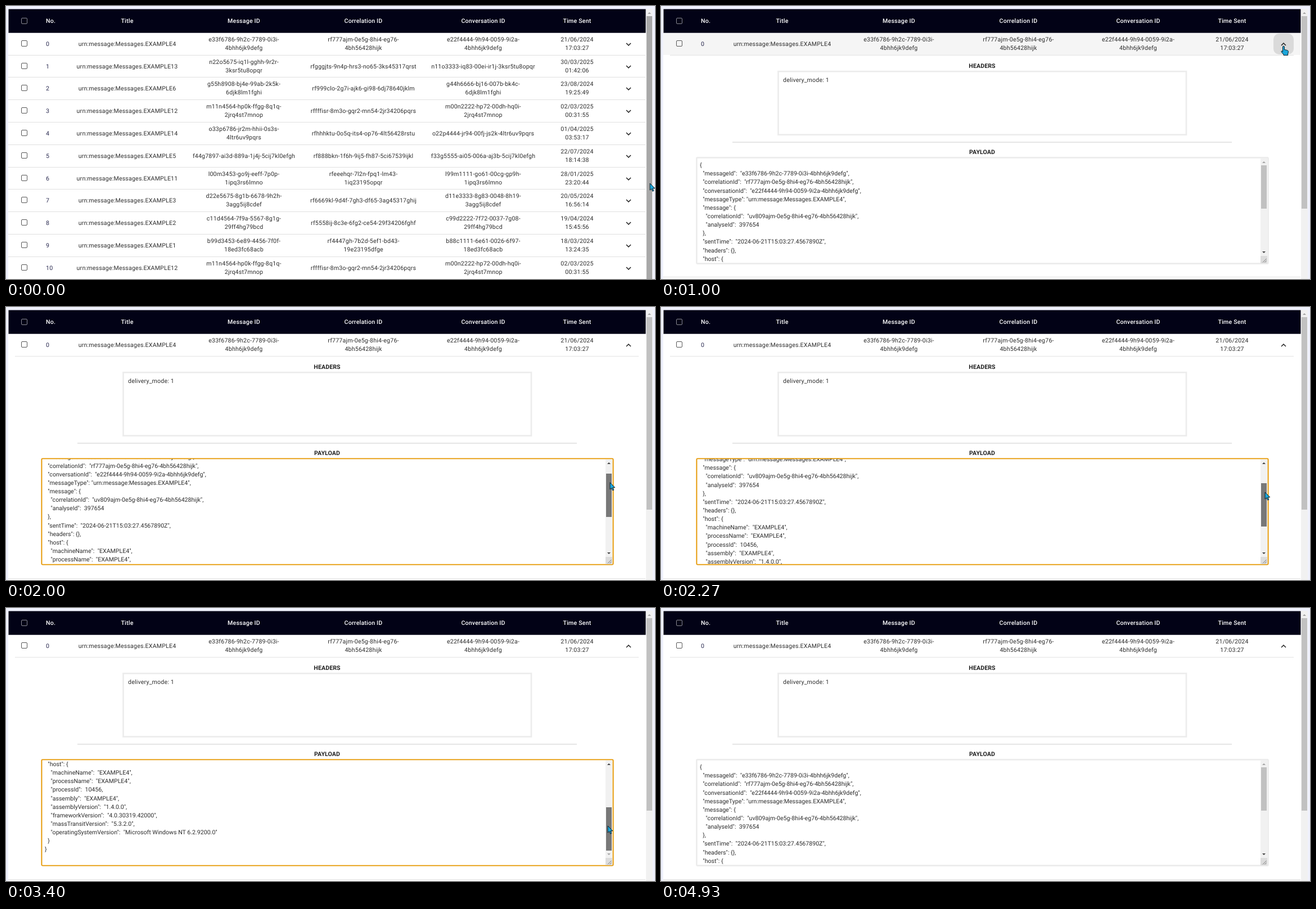
These frames come from a looping animation (1154 px wide and 485 px high, 5.27 s). An HTML page:

```html
<!DOCTYPE html>
<html lang="en">
<head>
<meta charset="utf-8">
<title>Message table</title>
<style>
  html, body { margin: 0; width: 100%; height: 100%; overflow: hidden; background: #eff1fc; }
  #stage {
    position: relative; width: 1154px; height: 485px; overflow: hidden;
    font: 10.6px/15px Roboto, Arial, sans-serif; letter-spacing: .19px;
    color: #2e2e2e; text-rendering: geometricPrecision; cursor: default;
  }
  #stage div, #stage svg, pre { position: absolute; box-sizing: border-box; }
  #stage > svg, #frame { left: 0; top: 0; width: 1154px; height: 485px; }
  .card { left: 4px; top: 5px; width: 1134px; height: 480px; background: #fff; }
  .head { left: 4px; top: 5px; width: 1133px; height: 43px; color: #fff; font-weight: 500; }
  .row { left: 4px; width: 1133px; height: 40px; border-top: 1px solid #e0e0e0; background: #fff; }
  .row.hover { background: #f5f5f5; }
  .cell { white-space: nowrap; text-align: center; }
  .cell.num { text-align: left; color: #2a2a50; }
  .head .cell.num { color: #fff; }
  .box { left: 23px; width: 11px; height: 11px; border: 1.5px solid #565656; border-radius: 2px; }
  .head .box { top: 16px; border-color: #8b8b93; }
  .btn { left: 1085px; top: 1px; width: 36px; height: 37px; border-radius: 10px; }
  .btn svg { left: 9px; top: 9.5px; width: 18px; height: 18px; fill: #1c1c1c; }
  #detail { left: 4px; top: 87px; width: 1133px; overflow: hidden; background: #fff; }
  #inner { left: -4px; top: -87px; width: 1154px; height: 485px; }
  .label { left: 471px; width: 200px; text-align: center; font-weight: 700; letter-spacing: .1px; color: #212121; }
  .field { fill: #fff; stroke: #ececec; stroke-width: 2.6px; }
  .field.focus { stroke: #e59700; stroke-width: 1.9px; }
  #view { left: 65px; top: 270px; width: 1000px; height: 187px; overflow: hidden; }
  pre { left: 4px; margin: 0; font: inherit; line-height: 15.14px; letter-spacing: 0; }
  .track { background: #f1f1f1; width: 12px; }
  .thumb { left: 1px; width: 10px; }
  .tri { left: 3px; border: 3px solid transparent; }
  .tri.up { border-top: 0; border-bottom-color: currentColor; }
  .tri.down { border-bottom: 0; border-top-color: currentColor; }
  #pointer path { fill: #1ba6da; stroke: #0e2029; stroke-linejoin: round; }
</style>
</head>
<body>
<div id="stage">
  <div class="card"></div>
  <div id="rows"></div>
  <div id="detail"><div id="inner">
    <div style="left:16px;top:87px;width:1109px;height:1px;background:#e3e3e3"></div>
    <svg id="frame">
      <rect class="field" x="208.5" y="116.2" width="725.5" height="112.5"/>
      <rect id="payload" class="field" x="63.4" y="269.4" width="1016.2" height="188.2" rx="1.5"/>
    </svg>
    <div class="label" style="top:99px">HEADERS</div>
    <div style="left:217px;top:124px">delivery_mode: 1</div>
    <div style="left:127px;top:241px;width:888px;height:1.5px;background:#e6e6e6"></div>
    <div class="label" style="top:252px">PAYLOAD</div>
    <div id="view"><pre id="json"></pre></div>
    <div class="track" style="left:1066px;top:271px;height:173px">
      <div id="up" class="tri up" style="top:5px"></div>
      <div id="thumb" class="thumb" style="height:77px"></div>
      <div id="down" class="tri down" style="top:165px"></div>
    </div>
    <svg style="left:1066px;top:444px" width="12" height="13">
      <path d="M0 0H12V13H0Z" fill="#dcdcdc"/>
      <path d="M4 11.5L10.5 5M7.5 11.5L10.5 8.5" stroke="#777" fill="none"/>
    </svg>
  </div></div>
  <svg><rect x="4.5" y="5.5" width="1133" height="42.2" fill="#020216"/></svg>
  <div class="head" id="head"><div class="box"></div></div>
  <div class="track" style="left:1138px;top:5px;height:480px">
    <div class="tri up" style="top:6px;color:#a3a3a3"></div>
    <div id="pageThumb" class="thumb" style="top:13px"></div>
  </div>
  <svg><g id="pointer">
    <path id="arrow" d="M0 0V12.2L2.8 9.7 4.8 14.2 6.8 13.3 4.9 9H8.8Z"/>
    <path id="hand" d="M-1.5 1Q-1.5-.8 0-.8Q1.5-.8 1.5 1V5.6L3.5 5.8 5.6 6.4 7.6 7.2Q8.7 8 8.6 9.5L7.6 13V15.5H0V14L-3.8 9.8Q-4.6 8-3 7.8L-1.5 9.2Z"/>
  </g></svg>
</div>
<script>
const LOOP = 5270, STEP = 200 / 3;
const PITCH = 39.8, ROW_TOP = 46.85, DETAIL = 395.4;
const THUMB_MIN = 283, THUMB_MAX = 354, GRAB = 16, SCROLL_RATIO = 2.42;
const $ = id => document.getElementById(id);
const clamp = (v, lo, hi) => Math.min(hi, Math.max(lo, v));

const columns = [["Title", 215.5], ["Message ID", 423], ["Correlation ID", 635.5],
  ["Conversation ID", 848.5], ["Time Sent", 1015.5]];

// title number, message, correlation, conversation, time; "|" breaks the line
const data = [
  "4 e33f6786-9h2c-7789-0i3i-|4bhh6jk9defg rf777ajm-0e5g-8hi4-eg76-|4bh56428hijk e22f4444-9h94-0059-9i2a-|4bhh6jk9defg 21/06/2024|17:03:27",
  "13 n22o5675-iq1l-gghh-9r2r-|3ksr5tu8opqr rfgggjts-9n4p-hrs3-no65-3ks45317qrst n11o3333-iq83-00ei-ir1j-3ksr5tu8opqr 30/03/2025|01:42:06",
  "6 g55h8908-bj4e-99ab-2k5k-|6djk8lm1fghi rf999clo-2g7i-ajk6-gi98-6dj78640jklm g44h6666-bj16-007b-bk4c-|6djk8lm1fghi 23/08/2024|19:25:49",
  "12 m11n4564-hp0k-ffgg-8q1q-|2jrq4st7mnop rffffisr-8m3o-gqr2-mn54-2jr34206pqrs m00n2222-hp72-00dh-hq0i-|2jrq4st7mnop 02/03/2025|00:31:55",
  "14 o33p6786-jr2m-hhii-0s3s-|4ltr6uv9pqrs rfhhhktu-0o5q-its4-op76-4lt56428rstu o22p4444-jr94-00fj-js2k-4ltr6uv9pqrs 01/04/2025|03:53:17",
  "5 f44g7897-ai3d-889a-1j4j-5cij7kl0efgh rf888bkn-1f6h-9ij5-fh87-5ci67539ijkl f33g5555-ai05-006a-aj3b-5cij7kl0efgh 22/07/2024|18:14:38",
  "11 l00m3453-go9j-eeff-7p0p-|1ipq3rs6lmno rfeeehqr-7l2n-fpq1-lm43-|1iq23195opqr l99m1111-go61-00cg-gp9h-|1ipq3rs6lmno 28/01/2025|23:20:44",
  "3 d22e5675-8g1b-6678-9h2h-|3agg5ij8cdef rf6669kl-9d4f-7gh3-df65-3ag45317ghij d11e3333-8g83-0048-8h19-|3agg5ij8cdef 20/05/2024|16:56:14",
  "2 c11d4564-7f9a-5567-8g1g-|29ff4hg79bcd rf5558ij-8c3e-6fg2-ce54-29f34206fghf c99d2222-7f72-0037-7g08-|29ff4hg79bcd 19/04/2024|15:45:56",
  "1 b99d3453-6e89-4456-7f0f-|18ed3fc68acb rf4447gh-7b2d-5ef1-bd43-|19e23195dfge b88c1111-6e61-0026-6f97-|18ed3fc68acb 18/03/2024|13:24:35",
];
data.push(data[3]);

$("json").textContent = `{
  "messageId":  "e33f6786-9h2c-7789-0i3i-4bhh6jk9defg",
  "correlationId":  "rf777ajm-0e5g-8hi4-eg76-4bh56428hijk",
  "conversationId":  "e22f4444-9h94-0059-9i2a-4bhh6jk9defg",
  "messageType": "urn:message:Messages.EXAMPLE4",
  "message": {
    "correlationId":  "uv809ajm-0e5g-8hi4-eg76-4bh56428hijk",
    "analyseId":  397654
  },
  "sentTime":  "2024-06-21T15:03:27.4567890Z",
  "headers": {},
  "host": {
    "machineName":  "EXAMPLE4",
    "processName":  "EXAMPLE4",
    "processId":  10456,
    "assembly":  "EXAMPLE4",
    "assemblyVersion":  "1.4.0.0",
    "frameworkVersion":  "4.0.30319.42000",
    "massTransitVersion":  "5.3.2.0",
    "operatingSystemVersion":  "Microsoft Windows NT 6.2.9200.0"
  }
}`;

function cell(parent, text, center, top) {
  const el = document.createElement("div");
  const lines = text.split("|");
  el.className = "cell";
  el.style.cssText = `left:${center - 124}px;width:240px;top:${lines.length > 1 ? top - 8 : top}px`;
  el.innerHTML = lines.join("<br>");
  parent.append(el);
  return el;
}

function numberCell(parent, text, top) {
  const el = cell(parent, text, 0, top);
  el.classList.add("num");
  el.style.left = "67px";
  el.style.width = "40px";
}

numberCell($("head"), "No.", 14);
columns.forEach(([name, x]) => cell($("head"), name, x, 14));

const rows = data.map((line, i) => {
  const el = document.createElement("div");
  el.className = "row";
  el.innerHTML = `<div class="box" style="top:13px"></div><div class="btn"><svg viewBox="0 0 24 24">
    <path d="M16.59 8.59L12 13.17 7.41 8.59 6 10l6 6 6-6z"/></svg></div>`;
  const [n, ...ids] = line.split(" ");
  numberCell(el, String(i), 12);
  ["urn:message:Messages.EXAMPLE" + n, ...ids].forEach((s, c) => cell(el, s, columns[c][1], 12));
  $("rows").append(el);
  return { el, btn: el.querySelector(".btn"), icon: el.querySelector("svg") };
});

// pointer path: time, x, y
const path = [
  [0, 1145, 315], [70, 1144, 305], [200, 1131, 218], [330, 1114, 118], [470, 1107, 72],
  [1200, 1107, 72], [1330, 1096, 130], [1470, 1078, 216], [1600, 1074, 270], [1730, 1074, 299],
  [1800, 1074, 299], [2270, 1074, 329], [2800, 1073, 372], [3130, 1073, 394], [3340, 1073, 394],
  [3400, 1070, 387], [3870, 1056, 309], [4000, 1050, 292], [4130, 1036, 292],
  [4270, 830, 330], [4400, 538, 398], [4470, 323, 470], [4530, 250, 520], [LOOP, 250, 520],
];

function pointerAt(t) {
  const i = Math.max(1, path.findIndex(p => p[0] >= t));
  const [t0, x0, y0] = path[i - 1], [t1, x1, y1] = path[i];
  const u = clamp((t - t0) / (t1 - t0), 0, 1);
  return [x0 + (x1 - x0) * u, y0 + (y1 - y0) * u];
}

// cubic-bezier(.4, 0, .2, 1)
function standardEase(x) {
  let lo = 0, hi = 1;
  for (let i = 0; i < 24; i++) {
    const s = (lo + hi) / 2, r = 1 - s;
    if (1.2 * r * r * s + .6 * r * s * s + s ** 3 < x) lo = s; else hi = s;
  }
  return 3 * (1 - lo) * lo * lo + lo ** 3;
}

function drawTable(t, x, y, open) {
  let overButton = false;
  rows.forEach(({ el, btn, icon }, i) => {
    const top = Math.round(ROW_TOP + PITCH * i + (i ? open : 0));
    const hover = x < 1137 && y >= top && y < top + 40;
    const onBtn = hover && x > 1089 && x < 1125;
    overButton = overButton || onBtn;
    el.style.top = top + "px";
    el.classList.toggle("hover", hover);
    const pressed = i === 0 && t >= 730;
    btn.style.background = !onBtn ? "none" : !pressed ? "#e9e9e9" : t < 930 ? "#cfcfcf" : "#dadada";
    icon.style.transform = pressed ? "rotate(180deg)" : "none";
  });
  return overButton;
}

function drawPayload(t, y) {
  const drag = t >= 1800 && t < 4130;
  const top = drag ? clamp(y - GRAB, THUMB_MIN, THUMB_MAX) : THUMB_MIN;
  $("thumb").style.top = top - 271 + "px";
  $("thumb").style.background = drag ? "#787878" : t > 1700 && t < 1800 ? "#a8a8a8" : "#c1c1c1";
  $("up").style.color = top > THUMB_MIN ? "#404040" : "#a3a3a3";
  $("down").style.color = top < THUMB_MAX ? "#404040" : "#a3a3a3";
  $("json").style.top = 5.2 - (top - THUMB_MIN) * SCROLL_RATIO + "px";
  $("payload").classList.toggle("focus", t >= 1800 && t < 4930);
}

function draw(now) {
  // the screen advances fifteen times a second, on whole hundredths
  const t = Math.round(Math.floor((now % LOOP + 3.4) / STEP) * STEP / 10) * 10;
  const [x, y] = pointerAt(t);
  const open = DETAIL * standardEase(clamp((t - 793) / 225, 0, 1));

  const hand = drawTable(t, x, y, open);
  $("detail").style.height = open + "px";
  drawPayload(t, y);

  $("pageThumb").style.height = 500 / (1 + open / 853) + "px";
  $("pageThumb").style.background = x > 1138 ? "#a8a8a8" : "#c1c1c1";
  $("arrow").style.display = hand ? "none" : "";
  $("hand").style.display = hand ? "" : "none";
  $("pointer").setAttribute("transform", `translate(${x} ${y})`);
}

const start = performance.now();
function tick() {
  draw(performance.now() - start);
  requestAnimationFrame(tick);
}
tick();
</script>
</body>
</html>
```
